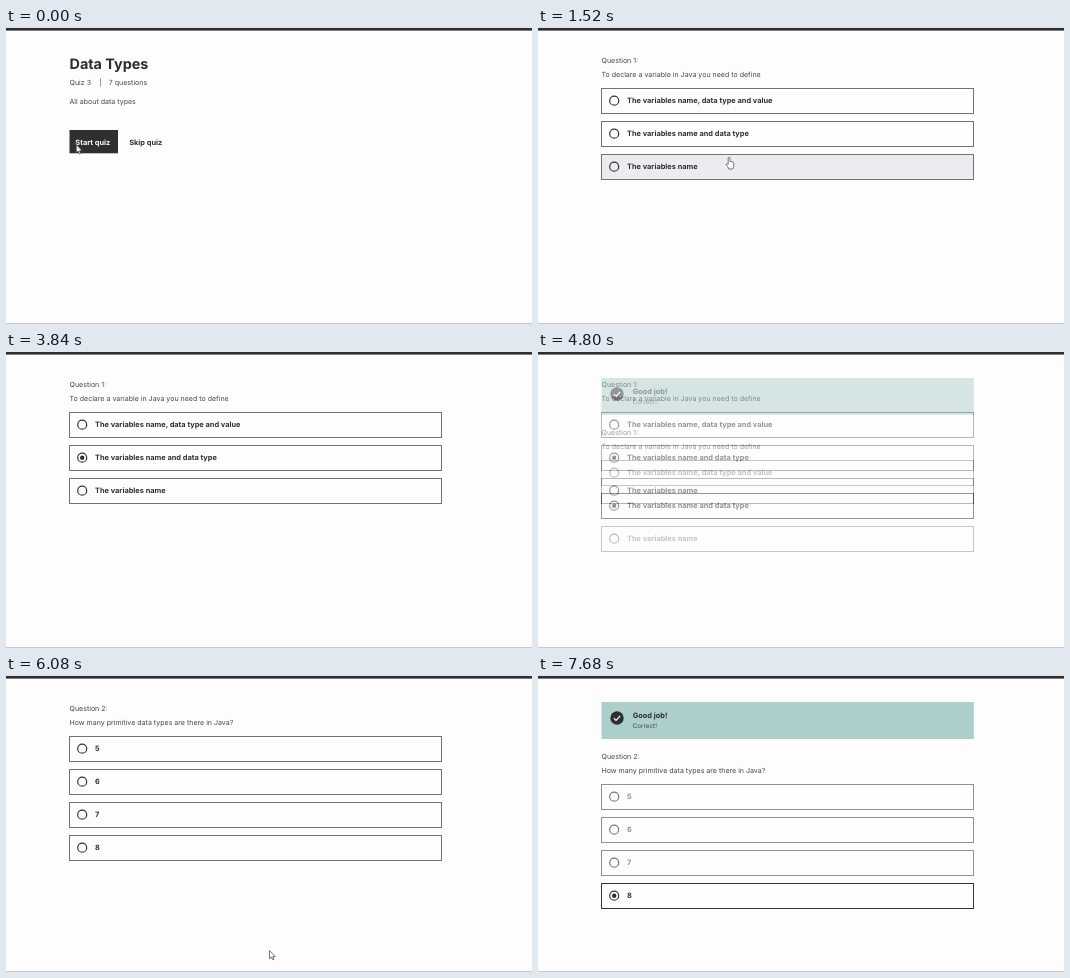
These frames come from a looping animation (526 px wide and 296 px high, 8000 ms). An HTML page:

```html
<!DOCTYPE html>
<html lang="en">
<head>
<meta charset="utf-8">
<title>Data types quiz</title>
<style>
html, body { margin: 0; width: 100%; height: 100%; overflow: hidden; background: #fdfdfd; }
svg { display: block; width: 526px; height: 296px; }
text { font-family: Inter, "Open Sans", sans-serif; font-size: 7.05px; fill: #454548; text-rendering: geometricPrecision; white-space: pre; }
.bold { font-size: 7.4px; font-weight: 700; fill: #2d2d30; }
</style>
</head>
<body>
<svg id="stage" viewBox="0 0 526 296"></svg>
<script>
const LOOP = 8000, STEP = 80;
const DARK = '#2d2f31';

const text = (x, y, str, attrs = '') => `<text x="${x}" y="${y}" ${attrs}>${str}</text>`;
const bold = (x, y, str, style = '') => text(x, y, str, `class="bold" style="${style}"`);
const rect = (x, y, w, h, fill, attrs = '') =>
  `<rect x="${x}" y="${y}" width="${w}" height="${h}" fill="${fill}" ${attrs}/>`;
const circle = (x, y, r, attrs) => `<circle cx="${x}" cy="${y}" r="${r}" ${attrs}/>`;

// Last entry whose start time has passed
const at = (keys, t) => keys.filter(k => k[0] <= t).pop();

const questions = [
  { no: 1, ask: 'To declare a variable in Java you need to define', right: 1, picked: 2880,
    options: ['The variables name, data type and value', 'The variables name and data type', 'The variables name'] },
  { no: 2, ask: 'How many primitive data types are there in Java?', right: 3, picked: 7200,
    options: ['5', '6', '7', '8'] }
];

// start, hovered row, strength
const hovers = [
  [0, -1, 0], [480, 1, 1], [720, 1, .5], [800, -1, 0],
  [1520, 2, .6], [1600, 2, 1], [1680, 2, .4], [1760, 1, .6], [1840, 1, 1],
  [3040, 1, .4], [3120, -1, 0],
  [7040, 3, .4], [7120, 3, 1], [7280, 3, .5], [7360, -1, 0]
];

// start, shape, x, y
const pointers = [
  [0, 'arrow', 70.3, 116.6], [80, 'hand', 69.5, 113], [720, 'arrow', 160, 130],
  [800, 'arrow', 194.3, 124], [1440, 'arrow', 193, 125], [1520, 'hand', 188, 129],
  [1600, 'hand', 182, 132], [1680, 'arrow', 174, 122], [1760, 'hand', 164, 112],
  [1840, 'hand', 155, 109], [1920, 'hand', 150.8, 108.8], [2560, 'hand', 150.5, 105],
  [3040, ''], [3760, 'arrow', 511.5, 280.5], [3840, ''],
  [5200, 'arrow', 453, 247.5], [5280, 'arrow', 388, 266], [5360, 'arrow', 319.5, 284], [5440, ''],
  [6000, 'arrow', 293.5, 281], [6080, 'arrow', 263.5, 274.5], [6240, 'arrow', 262.5, 274.5],
  [6480, 'arrow', 270, 278], [6560, ''],
  [7040, 'arrow', 84, 212], [7120, 'hand', 75.6, 169.6], [7280, 'arrow', 82, 194], [7360, '']
];

const shapes = {
  arrow: 'M0 0V8.2L1.9 6.5L3.2 9.3L4.4 8.8L3.2 6.1H5.8Z',
  hand: 'M2.2 7.4V1.2a.9.9 0 0 1 1.8 0V4.6C5 4.2 7.8 5 7.8 6V9C7.8 10.5 6.8 11 6.8 12H2.9C2.6 10.6 .6 8.6 .2 7.6C0 6.6 1.4 6.4 2.2 7.4Z'
};

function intro(t) {
  const button = t < 80 ? DARK : t < 160 ? '#404246' : '#505257';
  return bold(63.5, 40.8, 'Data Types', 'font-size:14.4px') +
    text(63.5, 57.2, 'Quiz 3') + text(93.3, 57.2, '|') + text(102.8, 57.2, '7 questions') +
    text(63.5, 75.7, 'All about data types') +
    rect(63.5, 102, 48.5, 23.3, button) +
    bold(69.3, 116.5, 'Start quiz', 'fill:#fff') + bold(123.2, 116.5, 'Skip quiz');
}

function option(label, top, on, off, hover) {
  const ink = off ? '#8f8f91' : DARK;
  const border = off ? '#909092' : on && hover < 0 ? '#333' : '#737375';
  const ring = `fill="none" stroke="${off ? '#78787a' : '#343437'}" stroke-width="1.2"`;
  return rect(63.5, top, 372, 25, '#fdfdfd', `stroke="${border}"`) +
    (hover > 0 ? rect(64, top + .5, 371, 24, '#e2e2e8', `opacity="${hover}"`) : '') +
    circle(76.2, top + 12.2, 4.5, ring) +
    (on ? circle(76.2, top + 12.2, 2.2, `fill="${DARK}"`) : '') +
    bold(89, top + 14.7, label, `fill:${ink}`);
}

function question(q, t, done) {
  const dy = done ? 48 : 0;
  const [, row, strength] = at(hovers, t);
  const banner = rect(63.5, 26, 372.3, 37, '#adcfcc') +
    circle(79, 42, 6.7, `fill="${DARK}"`) +
    '<path d="M75.8 42.2l2.2 2.2 4.2-4.5" fill="none" stroke="#fff" stroke-width="1.2"/>' +
    bold(94.7, 41.5, 'Good job!') + text(94.7, 52.2, 'Correct!', 'style="font-size:6.3px"');
  return (done ? banner : '') +
    text(63.5, 34.5 + dy, `Question ${q.no}:`) + text(63.5, 49.2 + dy, q.ask) +
    q.options.map((label, i) => {
      const on = i === q.right && (done || t >= q.picked);
      return option(label, 60.5 + 33 * i + dy, on, done && !on, done ? -1 : i === row ? strength : 0);
    }).join('');
}

// start, steps of the crossfade, page
const pages = [
  [0, 1, intro],
  [400, 3, t => question(questions[0], t, false)],
  [4800, 2, t => question(questions[0], t, true)],
  [5760, 2, t => question(questions[1], t, false)],
  [7520, 3, t => question(questions[1], t, true)]
];

function pointer(t) {
  const [, shape, x, y] = at(pointers, t);
  return shape ? `<path d="${shapes[shape]}" transform="translate(${x} ${y})" fill="#fff" stroke="#3c3c40" stroke-width=".7"/>` : '';
}

function render(t) {
  const now = at(pages, t), [start, steps, page] = now;
  const mix = Math.min(1, ((t - start) / STEP + 1) / steps);
  const before = mix < 1 ? pages[pages.indexOf(now) - 1][2](t) : '';
  return rect(0, 0, 526, 296, '#fdfdfd') + before +
    `<g opacity="${mix}">${mix < 1 ? rect(60, 20, 380, 216, '#fdfdfd') : ''}${page(t)}</g>` +
    rect(0, 0, 526, 2.6, '#2e2e32') + rect(0, 295, 526, 1, '#c8c8ca') + pointer(t);
}

const stage = document.getElementById('stage');
let shown = -1;
function tick() {
  const t = Math.floor(performance.now() % LOOP / STEP) * STEP;
  if (t !== shown) stage.innerHTML = render(shown = t);
  requestAnimationFrame(tick);
}
tick();
</script>
</body>
</html>
```
